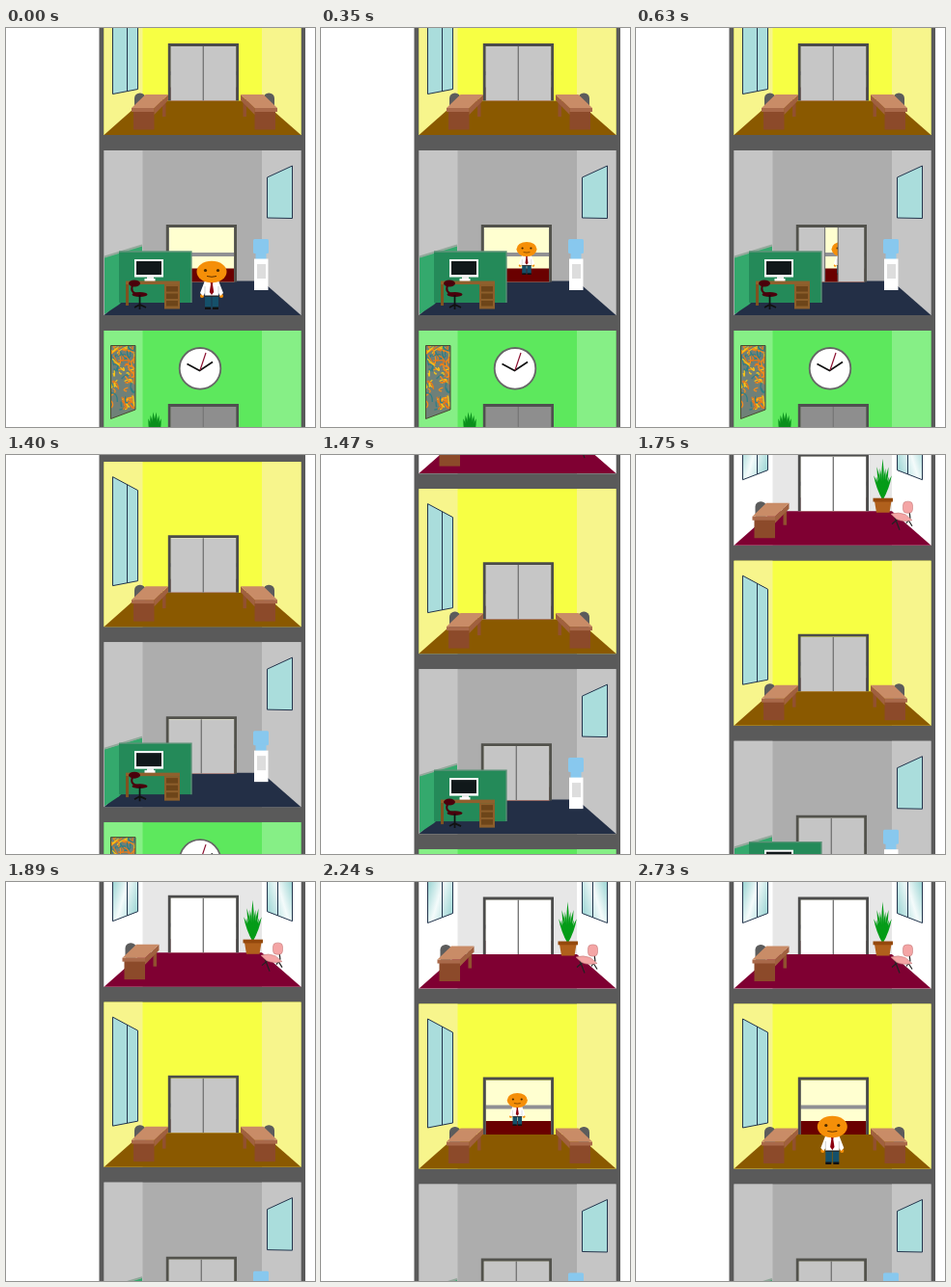
These frames come from a looping animation (320x414 px, 2.87 s). An HTML page:

```html
<!DOCTYPE html>
<html lang="en">
<head>
<meta charset="utf-8">
<title>Office lift</title>
<style>
html, body { margin: 0; width: 100%; height: 100%; overflow: hidden; background: #fff; }
svg { display: block; }
body > svg { width: 100%; height: 100%; }
</style>
</head>
<body>
<svg id="stage" viewBox="0 0 320 414">
  <defs>
    <linearGradient id="glass" x1="0" y1="0" x2="1" y2="1">
      <stop offset=".3" stop-color="#a5d9d8"/>
      <stop offset=".57" stop-color="#f4fbfb"/>
      <stop offset=".9" stop-color="#a5d9d8"/>
    </linearGradient>
  </defs>
</svg>
<script>
const STEP = 70, STEPS = 41;         // ms per step, steps per loop
const FLOOR = 187, RIDE = 186.5;     // storey height, distance travelled
const CABIN = { w: 68.4, h: 56.5 };
const ORANGE = '#f58f08', INK = '#23344c';

const clamp = v => Math.max(0, Math.min(1, v));
const mix = (a, b, p) => a + (b - a) * p;
const loop = (n, fn) => Array.from({ length: n }, (_, i) => fn(i)).join('');

// Shape helpers
const rect = (x, y, w, h, fill, extra = '') =>
  `<rect x="${x}" y="${y}" width="${w}" height="${h}" fill="${fill}" ${extra}/>`;
const shape = (d, fill, extra = '') => `<path d="${d}" fill="${fill}" ${extra}/>`;
const oval = (x, y, rx, ry, fill, extra = '') =>
  `<ellipse cx="${x}" cy="${y}" rx="${rx}" ry="${ry}" fill="${fill}" ${extra}/>`;
const line = (d, color, w = 1) => shape(d, 'none', `stroke="${color}" stroke-width="${w}"`);
const group = (body, attrs) => `<g ${attrs}>${body}</g>`;
const shift = (body, x, y) => group(body, `transform="translate(${x} ${y})"`);
const flip = (body, sum) => group(body, `transform="matrix(-1 0 0 1 ${sum} 0)"`);

// Upright quad on a side wall, seen in perspective
const wallQuad = (x, w, top, bottom, rise, drop) =>
  `M${x} ${top}l${w} ${rise}V${bottom + drop}L${x} ${bottom}Z`;
// Flat slab: front edge w wide, pushed back by (dx, -dy)
const slab = (x, y, w, dx, dy, fill) => shape(`M${x} ${y}h${w}l${dx} ${-dy}h${-w}Z`, fill);

function leaf(x, y, angle, length, w, color) {
  return shape(`M0 0Q${-w} ${-length / 2} 0 ${-length}Q${w} ${-length / 2} 0 0`, color,
    `transform="translate(${x} ${y}) rotate(${angle})"`);
}

function shell(side, back, ground) {
  return rect(101.5, 127, 204, 171, back) + rect(101.5, 127, 40, 171, side) +
    rect(265, 127, 40.5, 171, side) + shape('M141.5 262.5H265L305.5 298H101.5Z', ground);
}

// Lift: cabin, rider, sliding doors, frame
function lift(id, x, panel, frame, rider = '') {
  const y = id === 'grey' ? 207 : 206, { w, h } = CABIN;
  const door = (side, dx) => group(rect(dx, 0, w / 2, h, panel) + line(`M${w / 2} 0V${h}`, '#777', 1.2),
    `id="${id}${side}"`);
  return rect(x, y, w, h, '#ffffd0') + rect(x, y + 26, w, 4, '#909094') +
    rect(x, y + 42.5, w, 14, '#6a0000') + rider +
    `<svg x="${x}" y="${y}" width="${w}" height="${h}">${door('L', 0)}${door('R', w / 2)}</svg>` +
    line(`M${x - 1} ${y + h}V${y - 1.5}h${w + 2}v${h + 1.5}`, frame, 2.8);
}

// Origin at the centre of the head
function man(id) {
  const half = rect(.4, 24, 6.6, 13.5, '#15506a') + rect(1, 36.5, 6, 2.5, '#111') +
    oval(10, 25, 2, 2, ORANGE) + shape('M0 9H7L12 22L9 25L7 22V25H0Z', '#fff') +
    line('M7 15V24', '#bbb', .7);
  return group(half + flip(half, 0) + rect(-7, 24.5, 14, 1.3, '#222') +
    shape('M-1.5 10h3l-.5 3l1.2 8l-2.2 3l-2.2 -3l1.2 -8Z', '#8c0010') +
    oval(0, 0, 15.5, 11.2, ORANGE) +
    oval(-6.5, -1.5, 1.6, 1.6, '#4a2a00') + oval(6.5, -1.5, 1.6, 1.6, '#4a2a00') +
    line('M-5 4.5Q0 6 5 4.5', '#5a3000'), `id="${id}"`);
}

function desk() {
  const chair = rect(133, 254.5, 11.5, 19, '#5c5c5c', 'rx="5.5"');
  return chair + rect(162, 261, 3.5, 18, '#91502f') + rect(132, 272, 21.5, 20.5, '#8c4a2a') +
    shape('M153.5 270l14.5 -14v6l-14.5 15Z', '#a0603f') +
    rect(130, 270, 23.5, 4, '#a9694a') + slab(130, 270, 23.5, 14.5, 14, '#c98c67');
}

function greyRoom() {
  const cubicle = shape('M102 238L141 226V263L117 287L102 297Z', '#34a96d') +
    line('M102 237.5L141 225.5', '#93a89b', 2) +
    rect(117, 232, 75, 53, '#248a59') + line('M117 232H192V285', '#5f9279', 1.3);
  const computer = rect(133, 240, 30, 18.5, '#fff') + rect(135, 242, 26, 14, '#10181a') +
    rect(146, 258, 7, 3, '#eee') + rect(143.5, 260, 11, 3, '#fff');
  const table = rect(124, 262.5, 56, 3.5, '#8f602d') + rect(124, 266, 3, 22, '#80521f') +
    rect(164, 266, 16, 25.5, '#8c5e2b') + loop(3, i => rect(166, 268 + 7.5 * i, 12, 5.5, '#6d4519'));
  const chair = oval(133, 265, 6, 3.5, '#4a000c') + line('M131 267Q128 275 137 276', '#4a000c', 2) +
    oval(138.5, 276.5, 8, 2.4, '#4a000c') + line('M138.5 277V292M133 290l5.5 -3l6.5 3', '#111', 1.7);
  const cooler = rect(256, 219, 16, 15, '#88c8ee', 'rx="1.5"') + rect(258.5, 232, 11, 8, '#88c8ee') +
    rect(257, 239.5, 14.5, 32.5, '#fff') + rect(260, 245, 9, 15, '#ddd');
  return shell('#c5c5c5', '#adadad', '#232f46') +
    shape(wallQuad(270.5, 26, 155, 197, -12, .5), '#aadddc', `stroke="${INK}"`) +
    lift('grey', 168.2, '#c5c5c5', '#52524c', man('leaver')) +
    cubicle + computer + table + chair + cooler;
}

function twinWindow(bottom, drop, fill) {
  return shape(wallQuad(110.5, 26, 142.5, bottom, 14, drop), fill, `stroke="${INK}"`) +
    line(`M125.5 150.5V${bottom + drop * .58}`, INK);
}

function yellowRoom() {
  return shell('#f7f58c', '#f7ff44', '#8a5900') + twinWindow(255.5, -5, '#aadddc') +
    lift('yellow', 170.2, '#c6c6c6', '#4b4b4b', man('arriver')) + desk() + flip(desk(), 411);
}

function whiteRoom() {
  const glazing = twinWindow(230, -10, 'url(#glass)');
  const plant = loop(9, i => leaf(255.5, 251, (i - 4) * 5, 43 - Math.abs(i - 4) * 4 - i % 2 * 6, 2.6, '#059c18')) +
    shape('M247 252H264.5L262.5 264H249Z', '#b0601c') + rect(245.5, 249, 20.5, 3.8, '#94480c');
  const trim = 'stroke="#c47c7c" stroke-width=".6"';
  const chair = line('M268 269l5 13M284 269l-4 6M273 269l-8 7M281 270l5 8M283 262l1 8', '#222', 1.2) +
    rect(276.5, 252.5, 10, 12, '#f4a5a5', `rx="4" ${trim}`) +
    shape('M264 265.5Q272 263 279 266L286 272Q276 274 270 271Z', '#f4a5a5', trim);
  return shell('#fff', '#e7e7e7', '#7f0032') + glazing + flip(glazing, 407) +
    lift('white', 170.2, '#fff', '#4b4b4b') + shift(desk(), -9.5, -2) + plant + chair;
}

function greenRoom() {
  let seed = 7;
  const rnd = () => (seed = seed * 16807 % 2147483647) / 2147483647;
  const inks = ['#f28a1c', '#f5c518', '#e8791a', '#2f7f86'];
  const dab = i => {
    const x = rnd(), y = rnd();
    const at = () => `${109 + 24 * clamp(x + rnd() * .6 - .3)} ${143 + 66 * clamp(y + rnd() * .2 - .1)}`;
    return line(`M${at()}Q${at()} ${at()}`, inks[i % inks.length], 1.3);
  };
  const canvas = wallQuad(108.5, 25.5, 142.5, 218.5, 0, -9.5);
  const art = shape(canvas, '#6f8078') + loop(90, dab) + line(canvas, '#4a4a30');
  const clock = oval(201, 166.3, 21.3, 21.3, '#fff', 'stroke="#666" stroke-width="1.8"') +
    line('M187.5 161.5L200.5 168.5L214 159.5', '#111', 1.7) + line('M201 168L207 150', '#8c1030', 1.2);
  return shell('#86ef86', '#5de85d', '#3c7a3c') + art + clock +
    lift('green', 170.2, '#8e8e8e', '#4f4f4f') +
    loop(6, i => leaf(154, 248, (i - 2.5) * 5, 38 - Math.abs(i - 2.5) * 3, 4, '#0a8f1c'));
}

const rooms = [greenRoom, greyRoom, yellowRoom, whiteRoom];
stage.innerHTML += rect(96.5, 0, 213.5, 414, '#5a5a5a') +
  group(rooms.map((room, i) => shift(room(), 0, (1 - i) * FLOOR)).join(''), 'id="tower"');

const move = (id, x, y, s = 1) =>
  document.getElementById(id).setAttribute('transform', `translate(${x} ${y}) scale(${s})`);

function doors(id, open) {
  move(id + 'L', -CABIN.w / 2 * open, 0);
  move(id + 'R', CABIN.w / 2 * open, 0);
}

// p = 0 inside the cabin, p = 1 at the front of the room
const walk = (id, x, back, front, p) => move(id, x, mix(back, front, p), mix(.68, 1, p));

function draw(ms) {
  let i = Math.floor(ms % (STEP * STEPS) / STEP);
  const riding = i >= 20;
  if (!riding) i = Math.min(i, 9); // pause before the ride

  move('tower', 0, riding ? RIDE * (1 - clamp((28 - i) / 10) ** 2) : 0);
  doors('grey', riding ? 0 : clamp((10 - i) / 5));
  doors('yellow', clamp((i - 27) / 5));
  walk('leaver', 213, 229.5, 253, clamp(1 - i / 5));
  walk('arriver', 203.3, 227, 254.5, clamp((i - 32) / 7));
}

const start = performance.now();
function tick() {
  draw(performance.now() - start);
  requestAnimationFrame(tick);
}
tick();
</script>
</body>
</html>
```
